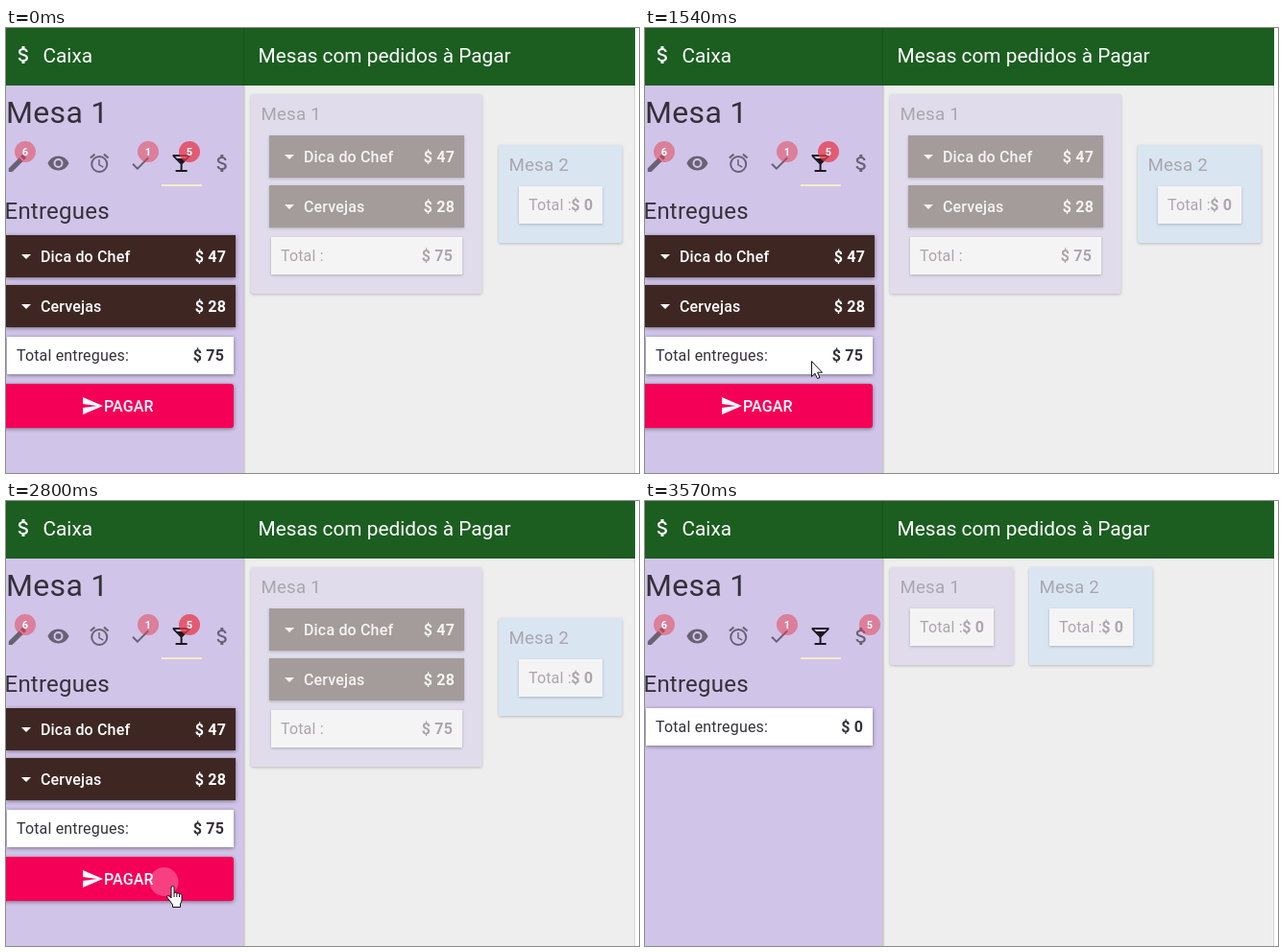
Write an HTML page that moves like this. It is 659 by 464 pixels and loops after 4.27 s.

```html
<!DOCTYPE html>
<html lang="pt">
<head>
<meta charset="utf-8">
<title>Caixa</title>
<style>
  html, body { margin: 0; width: 100%; height: 100%; overflow: hidden; background: #fff; }
  svg { display: block; }
  text { font: 16px Roboto, sans-serif; letter-spacing: .01em; white-space: pre; }
  .m { font-weight: 500; }
  .b { font-weight: 700; }
  .bar { font-size: 20.8px; letter-spacing: 0; fill: #fff; }
  .h1 { font-size: 32px; }
  .h2 { font-size: 24px; }
  .h3 { font-size: 18.72px; }
  .badge { font-size: 11px; font-weight: 700; fill: #fff; letter-spacing: 0; }
  .tip { font: 11.5px "Open Sans", sans-serif; letter-spacing: 0; }
  .end { text-anchor: end; }
  .mid { text-anchor: middle; }
  .up { filter: drop-shadow(0 1px 2px rgba(0,0,0,.45)); }
  .low { filter: drop-shadow(0 1px 1.5px rgba(0,0,0,.22)); }
</style>
</head>
<body>
<svg id="stage" width="659" height="464" viewBox="0 0 659 464"></svg>
<script>
const LOOP = 4270, STEP = 70;
const COLLAPSE = 3150, PAID = 3220, PRESS = 2660;
const INK = '#343139', FADED = '#aaa6ad';

const icons = {
  edit: 'M3 17.25V21h3.75L17.81 9.94l-3.75-3.75zM20.71 7.04a1 1 0 0 0 0-1.41l-2.34-2.34a1 1 0 0 0-1.41 0l-1.83 1.83 3.75 3.75z',
  eye: 'M12 4.5C7 4.5 2.73 7.61 1 12c1.73 4.39 6 7.5 11 7.5s9.27-3.11 11-7.5c-1.73-4.39-6-7.5-11-7.5zM12 17a5 5 0 1 1 0-10 5 5 0 0 1 0 10zm0-8a3 3 0 1 0 0 6 3 3 0 0 0 0-6z',
  alarm: 'M22 5.72l-4.6-3.86-1.29 1.53 4.6 3.86zM7.88 3.39L6.6 1.86 2 5.71l1.29 1.53zM12.5 8H11v6l4.75 2.85.75-1.23-4-2.37zM12 4a9 9 0 1 0 0 18 9 9 0 0 0 0-18zm0 16a7 7 0 1 1 0-14 7 7 0 0 1 0 14z',
  done: 'M9 16.2L4.8 12l-1.4 1.4L9 19 21 7l-1.4-1.4z',
  drink: 'M11 13v6H6v2h12v-2h-5v-6l8-8V3H3v2zM7.5 7l-2-2h13l-2 2z',
  money: 'M11.8 10.9c-2.27-.59-3-1.2-3-2.15 0-1.09 1.01-1.85 2.7-1.85 1.78 0 2.44.85 2.5 2.1h2.21c-.07-1.72-1.12-3.3-3.21-3.81V3h-3v2.16c-1.94.42-3.5 1.68-3.5 3.61 0 2.31 1.91 3.46 4.7 4.13 2.5.6 3 1.48 3 2.41 0 .69-.49 1.79-2.7 1.79-2.06 0-2.87-.92-2.98-2.1h-2.2c.12 2.19 1.76 3.42 3.68 3.83V21h3v-2.15c1.95-.37 3.5-1.5 3.5-3.55 0-2.84-2.43-3.81-4.7-4.4z',
  send: 'M2 21L23 12 2 3v7l15 2-15 2z',
  drop: 'M7 10l5 5 5-5z'
};

const icon = (name, x, y, fill) =>
  `<path d="${icons[name]}" transform="translate(${x} ${y})" fill="${fill}"/>`;
const rect = (x, y, w, h, fill, cls = '', r = 0) =>
  `<rect x="${x}" y="${y}" width="${w}" height="${h}" rx="${r}" fill="${fill}" class="${cls}"/>`;
const text = (s, x, y, fill, cls = '') =>
  `<text x="${x}" y="${y}" fill="${fill}" class="${cls}">${s}</text>`;

const item = (name, price, x, y, w, bg, fg, shadow) =>
  rect(x, y, w, 44, bg, shadow) + icon('drop', x + 9, y + 10, fg) +
  text(name, x + 36, y + 28, fg, 'm') + text('$ ' + price, x + w - 10, y + 28, fg, 'b end');

const items = (x, y, ...look) =>
  item('Dica do Chef', 47, x, y, ...look) + item('Cervejas', 28, x, y + 52, ...look);

const total = (label, sum, x, y, w, bg, fg, shadow) =>
  rect(x, y, w, 39, bg, shadow) + text(label, x + 10, y + 25, fg) +
  text('$ ' + sum, x + w - 10, y + 25, fg, 'b end');

// Table card; with open it also lists its orders
function table(n, sum, x, y, bg, open) {
  const w = open ? 199 : sum ? 96 : 87;
  return rect(x, y, w + 41.5, open ? 208 : 102, bg, 'low', 2) +
    text('Mesa ' + n, x + 10.5, y + 27, FADED, 'h3') +
    (open ? items(x + 19, y + 43, 203, '#a49c9a', '#f5f3f4', 'low') : '') +
    total('Total :', sum, x + 21, y + (open ? 149 : 43), w, '#f5f4f5', FADED, 'low');
}

const tables = (sum, x2, y2, open) =>
  table(1, sum, 255, 69, '#e1dcec', open) + table(2, 0, x2, y2, '#d9e6f2');

const button = y =>
  rect(-4, y, 241, 46, '#f50057', 'up', 3) + icon('send', 78, y + 11, '#fff') +
  text('PAGAR', 102, y + 29, '#fff', 'm');

const badge = (n, x, alpha) =>
  `<circle cx="${x}" cy="129" r="11" fill="rgba(229,57,75,${alpha})"/>` +
  text(n, x, 133, '#fff', 'badge mid');

const bill = (sum, y) => total('Total entregues:', sum, 1, y, 236, '#fff', INK, 'up');

const tabs = ['edit', 'eye', 'alarm', 'done', 'drink', 'money'].map((name, i) =>
  icon(name, 42.7 * i - .2, 129, name == 'drink' ? '#1c191f' : 'rgba(0,0,0,.5)')).join('');

stage.innerHTML = `
  <clipPath id="clip">${rect(0, 371, 237, 46, '#000', '', 3)}</clipPath>
  <linearGradient id="edge"><stop stop-opacity=".2"/><stop offset="1" stop-opacity="0"/></linearGradient>
  ${rect(0, 0, 655, 464, '#eee')}
  ${rect(0, 60, 247, 404, '#d1c4e9')}
  ${rect(247, 0, 3, 464, 'url(#edge)')}
  ${rect(0, 0, 655, 60, '#1b5e20')}
  ${rect(247, 0, 1, 60, '#185419')}
  ${rect(654, 60, 1, 404, '#d4d4d4')}
  ${icon('money', 6.5, 16, '#fff')}
  ${text('Caixa', 38.5, 36, '#fff', 'bar')}
  ${text('Mesas com pedidos à Pagar', 262.5, 36, '#fff', 'bar')}
  ${text('Mesa 1', 0, 99, INK, 'h1')}
  ${tabs}${badge(6, 20, .5)}${badge(1, 148, .5)}
  ${rect(162, 163, 42, 2, '#f2eec4')}
  ${text('Entregues', -1.5, 199, INK, 'h2')}
  <g class="view">
    ${badge(5, 191, .75)}${items(0, 216, 239, '#3e2723', '#fff', 'up')}
    ${bill(75, 322)}${button(371)}${tables(75, 513, 122, true)}
    <circle id="ripple" cx="164.5" cy="397" fill="#fff" fill-opacity=".25" clip-path="url(#clip)"/>
  </g>
  <g class="view">${badge(5, 191, .75)}${bill(75, 216)}${button(265)}${tables(75, 409, 69)}</g>
  <g class="view">${badge(5, 234, .5)}${bill(0, 216)}${tables(0, 400, 69)}</g>
  <g id="tip">
    ${rect(167, 426, 40, 19, 'rgba(0,0,0,.4)')}
    ${rect(164.5, 423.5, 40, 19, '#fff')}
    <rect x="164.5" y="423.5" width="40" height="19" fill="none" stroke="#767676"/>
    ${text('Caixa', 184.5, 437, '#666', 'tip mid')}
  </g>
  <g id="cursor" fill="#fff" stroke="#111" stroke-linejoin="round">
    <path id="arrow" d="M.5 .5V16.5L4 13.2 6.5 18.5 9 17.5 6.6 12.2H11.5Z"/>
    <path id="hand" d="M5 13V2a1.5 1.5 0 0 1 3 0V8a1.5 1.5 0 0 1 2.8.5 1.5 1.5 0 0 1 2.7.8 1.4 1.4 0 0 1 2.5 1V15q0 2-1.5 4v3.5H6.5V20L1 12.5q-.8-1.8.7-2 1 0 3.3 2.5zM8 8v4M10.8 8.5V12M13.5 9.3V12"/>
  </g>`;

// Pointer stops: time, x, y
const path = [
  [70, 501, 448], [210, 385, 392], [350, 270, 338], [560, 195, 305],
  [770, 195, 305], [910, 191, 340], [1050, 184, 384], [1120, 182, 382],
  [1190, 181, 355], [1330, 178, 301], [1400, 177, 291], [1470, 177, 291],
  [1540, 173, 347], [1680, 168, 391], [1820, 167, 401], [2940, 167, 401],
  [3010, 152, 386], [3080, 123, 361], [3150, 125, 311], [3220, 134, 240],
  [3290, 146, 206], [3360, 198, 232], [3500, 476, 442]
];

function pointer(t) {
  const i = path.findIndex(p => p[0] >= t);
  if (i < 1) return path[Math.max(i, 0)].slice(1);
  const [a, b] = [path[i - 1], path[i]], k = (t - a[0]) / (b[0] - a[0]);
  return [1, 2].map(j => Math.round(a[j] + (b[j] - a[j]) * k));
}

const views = document.querySelectorAll('.view');
const show = (el, on) => el.style.display = on ? '' : 'none';

function draw(now) {
  const t = Math.floor(now % LOOP / STEP) * STEP;
  const state = t < COLLAPSE ? 0 : t < PAID ? 1 : 2;
  views.forEach((v, i) => show(v, i == state));

  ripple.setAttribute('r', Math.max(0, 45 * (t - PRESS) / 420));
  show(tip, t >= 2310 && t < 2730);
  tip.style.opacity = Math.min(1, .4 + (t - 2310) / 140 * .6);

  const inside = t >= 70 && t < 3570;
  show(cursor, inside);
  if (inside) {
    const [x, y] = pointer(t);
    const link = state == 0 && x < 237 && y >= 360;
    cursor.setAttribute('transform', `translate(${x} ${y})`);
    show(hand, link);
    show(arrow, !link);
  }
  requestAnimationFrame(draw);
}
requestAnimationFrame(draw);
</script>
</body>
</html>
```
